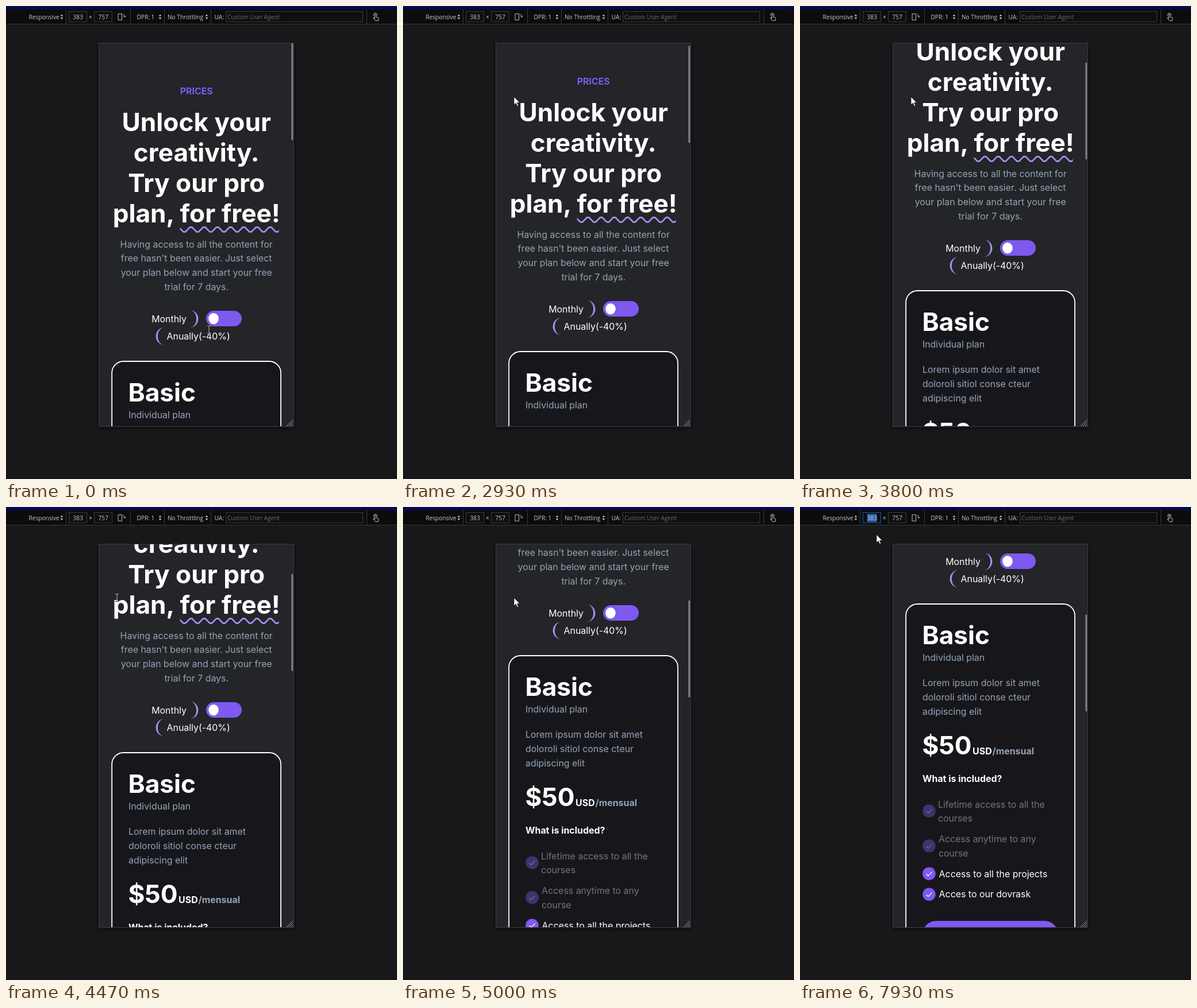
An HTML page that plays this animation: 680x824 px, repeating every 8000 ms.

```html
<!DOCTYPE html>
<html lang="en">
<head>
<meta charset="utf-8">
<title>Pricing page preview</title>
<style>
  html, body { margin: 0; width: 100%; height: 100%; overflow: hidden; background: #18181a; }
  svg { display: block; width: 680px; height: 824px; }
  text {
    font-family: Inter, sans-serif; font-size: 15.9px; fill: #fff;
    font-optical-sizing: none; font-feature-settings: "calt" 0;
  }
  .big { font-size: 44.2px; font-weight: 700; }
  .bold { font-weight: 700; }
  .mid { text-anchor: middle; }
  .mute { fill: #94a3b8; }
  .violet { fill: #7f59f0; }
  .bar text { font-family: "Open Sans", "Noto Sans", sans-serif; font-size: 10.1px; fill: #c6c6ca; }
  .bar .hint { fill: #6b6b70; }
  .field { fill: #0f0f11; stroke: #3c3c41; }
  .icon { fill: none; stroke: #c0c0c4; stroke-linecap: round; stroke-linejoin: round; }
  #beam { fill: none; stroke: #e4e4e4; mix-blend-mode: difference; }
</style>
</head>
<body>
<svg viewBox="0 0 680 824" xmlns="http://www.w3.org/2000/svg">
  <defs>
    <clipPath id="screen"><rect x="162" y="65" width="338" height="667"/></clipPath>
    <clipPath id="underline"><rect x="302.7" y="380" width="171.8" height="20"/></clipPath>
    <filter id="soft" x="-10%" y="-10%" width="120%" height="120%"><feGaussianBlur stdDeviation="2.5"/></filter>
  </defs>
  <rect width="680" height="824" fill="#18181a"/>
  <rect x="161" y="66" width="340" height="669" fill="#0c0c0d" filter="url(#soft)"/>
  <rect x="161.5" y="64.5" width="339" height="668" fill="#232528" stroke="#3b3c40"/>

  <g clip-path="url(#screen)">
    <g id="page">
      <rect x="184.2" y="619" width="293.8" height="760" rx="20" fill="#17171b" stroke="#fff" stroke-width="1.8"/>
      <path id="wave" fill="none" stroke="#ab8ffb" stroke-width="2.6" clip-path="url(#underline)"/>
      <rect class="violet" x="348" y="531" width="62" height="27" rx="13.5"/>
      <ellipse cx="361" cy="544.6" rx="8.8" ry="9.6" fill="#fff"/>
      <path id="crescent" d="M319.5 529.8A14.7 15 0 0 1 319.5 560.2A11.4 15 0 0 0 319.5 529.8Z" fill="#a88cf2"/>
      <use href="#crescent" transform="matrix(-1 0 0 1 595 30.2)"/>
      <rect class="violet" x="213.5" y="1171" width="235" height="52" rx="23"/>
    </g>
    <rect id="thumb" x="496.4" width="2.8" height="169" rx="1.4" fill="#85868a"/>
    <path d="M488 732l11-11M492 732l7-7M496 732l3-3" stroke="#a5a5a8" fill="none"/>
  </g>

  <g class="bar" id="bar">
    <rect width="680" height="31" fill="#0c0c0d"/>
    <rect width="680" height="5.5" fill="#060b50"/>
    <path id="rules" stroke="#38383d" fill="none"/>
    <rect class="field" id="wide" x="109.5" y="9.5" width="31" height="18"/>
    <rect class="field" x="153.5" y="9.5" width="31" height="18"/>
    <rect class="field" x="382.5" y="9.5" width="238" height="18"/>
    <rect id="mark" x="117" y="12" width="0" height="14" fill="#2c62a8"/>
    <path class="icon" d="M195.5 13.5h6v11h-6zM203.5 14.5q3 0 3 4.5M204.7 17.6l1.8 1.8 1.8-1.8"/>
    <path class="icon" d="M641.2 21.5V15.2a1.2 1.2 0 0 1 2.4 0V19l3.4.9q1.2.4 1 1.7l-.6 3.9h-5.2l-3-4q-.6-1.2.5-1.5zM639.3 16.4a3.2 3.2 0 1 1 6.2 0"/>
  </g>

  <path id="arrow" d="M0 0V14.2L3.3 11.2L5.6 16.4L7.9 15.4L5.6 10.4H10Z" fill="#fff" stroke="#111" stroke-width=".8"/>
  <path id="beam" d="M-3-6.5H-.8L0-5.8L.8-6.5H3M0-5.8V5.8M-3 6.5H-.8L0 5.8L.8 6.5H3"/>
</svg>
<script>
const $ = id => document.getElementById(id);
const NS = 'http://www.w3.org/2000/svg';

function add(parent, tag, attrs, content) {
  const el = document.createElementNS(NS, tag);
  for (const name in attrs) el.setAttribute(name, attrs[name]);
  if (content) el.textContent = content;
  parent.appendChild(el);
  return el;
}
const page = $('page'), bar = $('bar');
const write = (x, y, cls, str, parent = page) => add(parent, 'text', { x, y, class: cls }, str);
const lines = (x, y, step, cls, list, parent) =>
  list.forEach((str, i) => write(x, y + i * step, cls, str, parent));

// Page
const LEAD = 24.74;
write(331.2, 153.7, 'mid bold violet', 'PRICES');
lines(331.2, 218, 53, 'mid big', ['Unlock your', 'creativity.', 'Try our pro', 'plan, for free!']);
lines(331.2, 420.6, LEAD, 'mid mute', [
  'Having access to all the content for', "free hasn't been easier. Just select",
  'your plan below and start your free', 'trial for 7 days.']);
write(253.2, 550.6, '', 'Monthly');
write(279.6, 580.8, '', 'Anually(-40%)');
write(212.4, 689.1, 'big', 'Basic');
write(212.9, 718.2, 'mute', 'Individual plan');
lines(213, 762.4, LEAD, 'mute', ['Lorem ipsum dolor sit amet', 'doloroli sitiol conse cteur', 'adipiscing elit']);
write(212.4, 880.7, 'big', '$50');
write(300.1, 880.7, 'bold', 'USD');
write(334.6, 880.7, 'bold mute', '/mensual');
write(213, 929.2, 'bold', 'What is included?');

function feature(cy, x, y, opacity, list) {
  const g = add(page, 'g', { opacity });
  add(g, 'circle', { class: 'violet', cx: 224.5, cy, r: 11.3 });
  add(g, 'path', { d: `M219.6 ${cy + .4}l3.4 3.4l6.6-7`, fill: 'none', stroke: '#fff', 'stroke-width': 1.3 });
  lines(x, y, LEAD, '', list, g);
}
feature(979.5, 240, 973.5, .4, ['Lifetime access to all the', 'courses']);
feature(1040.3, 241, 1034.3, .4, ['Access anytime to any', 'course']);
feature(1088.8, 241.6, 1095, 1, ['Access to all the projects']);
feature(1124.8, 241.6, 1130.4, 1, ['Acces to our dovrask']);

const RISE = 7.95, FLAT = 3.53;
$('wave').setAttribute('d', 'M297 385.4' + `h${FLAT}l${RISE} ${RISE}h${FLAT}l${RISE} ${-RISE}`.repeat(8));

// Toolbar
$('rules').setAttribute('d', 'M0 31.5H680' + [104, 216, 275, 356, 627].map(x => `M${x + .5} 6V31`).join(''));
for (const x of [97, 268, 349])
  add(bar, 'path', { d: `M${x - 2.3} 17.8h4.6l-2.3-3.3zM${x - 2.3} 20h4.6l-2.3 3.3z`, fill: '#c6c6ca' });
[[39.5, 'Responsive'], [116.6, '383'], [144, '×'], [160.6, '757'], [227.5, 'DPR: 1'],
 [281, 'No Throttling'], [362.5, 'UA:']].forEach(([x, str]) => write(x, 22.7, '', str, bar));
write(385, 22.9, 'hint', 'Custom User Agent', bar);

// Motion: each key is [tick, value, ...], 15 ticks per second
const TICK = 1000 / 15, LOOP = 8000;
const SCROLL = [[43, 0], [47, 90], [55, 90], [60, 180], [66, 180], [75, 360], [82, 360], [86, 450]];
const MOUSE = [
  [0, 353, 564], [3, 318, 455], [4, 296, 421], [5, 312, 446], [7, 312, 446],
  [12, 270, 320], [16, 222, 190], [18, 206, 151], [20, 202, 153], [21, 201, 153],
  [23, 201, 153], [26, 193, 158], [87, 193, 158], [90, 172, 122], [94, 110, 36], [97, 115, 22],
  [100, 115, 22], [107, 137, 21], [108, 137, 21], [110, 134, 21], [112, 138, 21],
  [114, 138, 21], [116, 143, 25], [119, 133, 48]];
const FOCUS = 101;

// Areas of selectable text on the page: left, right, middle, half height
const TEXT = [[303, 360, 147, 10], [203, 460, 202, 26], [225, 438, 255, 26], [215, 448, 308, 26],
  [188, 474, 361, 26], [198, 464, 452, 50], [254, 315, 545, 12], [280, 386, 575, 12]];

const linear = p => p;
const glide = p => (2 * p * p * (3 - 2 * p) + p) / 3;

function at(keys, k, ease) {
  const i = keys.findIndex(key => key[0] > k);
  if (i === 0) return keys[0].slice(1);
  if (i < 0) return keys[keys.length - 1].slice(1);
  const a = keys[i - 1], b = keys[i], p = ease((k - a[0]) / (b[0] - a[0]));
  return a.slice(1).map((v, n) => Math.round(v + (b[n + 1] - v) * p));
}

function overText(x, y, scroll) {
  if (y < 31) return y > 9 && y < 28 && x > 109 && x < 141;
  return y > 65 && TEXT.some(([l, r, mid, half]) => x >= l && x <= r && Math.abs(y + scroll - mid) <= half);
}

function draw(t) {
  const k = Math.floor((t + 5) / TICK);
  const [scroll] = at(SCROLL, k, glide);
  const [x, y] = at(MOUSE, k, linear);
  const beam = overText(x, y, scroll);
  page.setAttribute('transform', `translate(0 ${-scroll})`);
  $('thumb').setAttribute('y', 65 + scroll * .2715);

  for (const [id, shown] of [['arrow', !beam], ['beam', beam]]) {
    $(id).setAttribute('transform', `translate(${x} ${y})`);
    $(id).style.display = shown ? '' : 'none';
  }

  const focused = k >= FOCUS;
  $('wide').style.stroke = focused ? '#1556a8' : '';
  $('mark').setAttribute('width', !focused ? 0 : k > 107 ? 16.5 : Math.max(0, Math.min(16.5, x - 117)));
}

const start = performance.now();
function loop(now) {
  draw(Math.max(0, now - start) % LOOP);
  requestAnimationFrame(loop);
}
draw(0);
requestAnimationFrame(loop);
</script>
</body>
</html>
```
